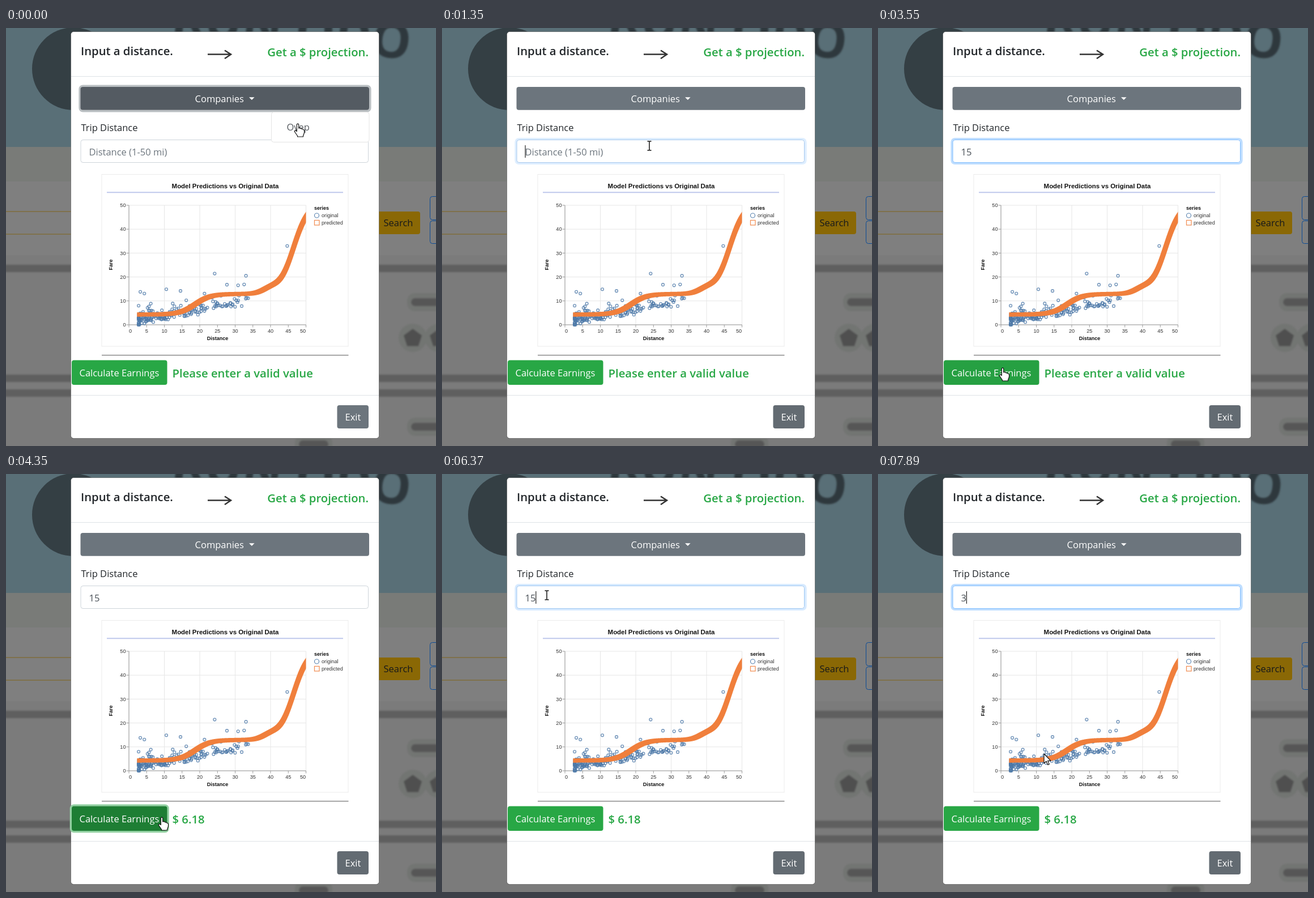
Animation, 759 px wide and 738 px high, one loop 8000 ms. Source, as an HTML page:

```html
<!DOCTYPE html>
<html lang="en">
<head>
<meta charset="utf-8">
<title>Trip earnings</title>
<style>
html, body { margin: 0; width: 100%; height: 100%; overflow: hidden; background: #7b7b7b; }
svg { display: block; width: 759px; height: 738px; }
text { font: 16.5px "Open Sans", "Noto Sans", sans-serif; white-space: pre; }
.head { font-size: 20.3px; font-weight: 600; }
.green { fill: #28a745; }
.white { fill: #fff; }
.chart text { font: 9.2px "Liberation Sans", Arial, sans-serif; fill: #333; }
.chart .b { font-weight: 700; font-size: 9px; fill: #111; }
.chart .title { font-weight: 700; font-size: 11.45px; fill: #111; }
.mid { text-anchor: middle; }
.end { text-anchor: end; }
</style>
</head>
<body>
<svg viewBox="0 0 759 738">
  <defs>
    <filter id="soft" x="-20%" y="-60%" width="140%" height="220%"><feGaussianBlur stdDeviation="1.6"/></filter>
    <clipPath id="plot"><rect x="217" y="308" width="312.5" height="222"/></clipPath>
  </defs>

  <rect width="759" height="210" fill="#596f77"/>
  <circle cx="119" cy="72" r="73" fill="#343f44"/>
  <text transform="translate(290 8) rotate(6.5)" style="font-size:88px;font-weight:700" fill="#2f393d" filter="url(#soft)">RUN ODO</text>
  <rect y="210" width="759" height="61" fill="#797b78"/>
  <rect y="271" width="759" height="130" fill="#7f7f7f"/>
  <rect x="-5" y="324" width="200" height="40" fill="none" stroke="#80651a"/>
  <rect x="600" y="324" width="131" height="40" rx="4" fill="#8a6805"/>
  <text x="666.5" y="350" fill="#16181b">Search</text>
  <g fill="none" stroke="#0b4c97">
    <rect x="748.5" y="297.5" width="40" height="41" rx="4"/>
    <rect x="748.5" y="340.5" width="40" height="40" rx="4"/>
  </g>
  <g id="marks" filter="url(#soft)"></g>

  <rect x="114.5" y="6.5" width="544" height="718" rx="5" fill="#fff" stroke="#000" stroke-opacity=".35"/>
  <path d="M115 85.5H658M115 648.5H658" stroke="#dee2e6"/>
  <text class="head" x="132" y="48" fill="#212529">Input a distance.</text>
  <path d="M356 46.5H396M386 39.5L397 46.5L386 54" fill="none" stroke="#333" stroke-width="2.5"/>
  <text class="head green end" x="640" y="50">Get a $ projection.</text>

  <rect id="menuRing" x="130.2" y="102.2" width="512.6" height="44.6" rx="5.5" fill="none" stroke="#828a91" stroke-opacity=".55" stroke-width="3.6"/>
  <rect id="menu" x="131.5" y="104" width="509.5" height="40.7" rx="4"/>
  <text class="white" x="333.5" y="131">Companies</text>
  <path d="M429 122.2h9.6l-4.8 4.8z" fill="#fff"/>

  <text x="132.5" y="182" fill="#212529">Trip Distance</text>
  <rect id="fieldRing" x="130.2" y="195.7" width="511.6" height="43.6" rx="5.5" fill="none" stroke="#bfdeff" stroke-width="3.6"/>
  <rect id="field" x="132" y="197.5" width="507.5" height="40" rx="4" fill="#fff"/>
  <rect id="picked" x="147" y="207" width="18" height="22" fill="#2f7fe0"/>
  <text id="value" x="146.5" y="225"></text>
  <path id="caret" d="M0 207V229" stroke="#222" stroke-width="1.2"/>

  <g class="chart">
    <rect x="169" y="258.5" width="435" height="303.5" fill="#fff" stroke="#ebebeb"/>
    <text class="title mid" x="387" y="282.5">Model Predictions vs Original Data</text>
    <path d="M178 290.3H595" stroke="#bfc8ec" stroke-width="2"/>
    <g id="axes"></g>
    <text class="b mid" x="373.5" y="551">Distance</text>
    <text class="b mid" transform="translate(188 418) rotate(-90)">Fare</text>
    <g id="dots" fill="none" stroke="#4c78a8" stroke-width="1.35" stroke-opacity=".8"></g>
    <path id="curve" fill="#f07f3c" clip-path="url(#plot)"/>
    <text class="b" x="544" y="320.5">series</text>
    <circle cx="548.5" cy="331" r="4" fill="none" stroke="#5f87b2" stroke-width="1.2"/>
    <rect x="544.5" y="339.5" width="8.5" height="8.5" fill="none" stroke="#f2925a" stroke-width="1.3"/>
    <text x="557" y="334">original</text>
    <text x="557" y="347">predicted</text>
  </g>
  <path d="M169 577.7H604.5" stroke="#777" stroke-width="1.2"/>

  <rect id="calcRing" x="114.5" y="585" width="171.5" height="46.5" rx="5.5" fill="none" stroke="#93d1a2" stroke-width="3.6"/>
  <rect id="calc" x="116" y="586.5" width="168.5" height="43.5" rx="4"/>
  <text class="white" x="129.5" y="615">Calculate Earnings</text>
  <text id="result" class="head green" x="293.5" y="616.5"></text>
  <rect id="exit" x="584.5" y="666" width="55.5" height="41" rx="4"/>
  <text class="white" x="598.5" y="693">Exit</text>

  <g id="drop">
    <rect x="468.5" y="148.5" width="172.5" height="53" rx="4" fill="#fff" stroke="#e4e4e4"/>
    <text x="495.5" y="181" fill="#555a5f">Ovep</text>
  </g>
  <path id="cursor" stroke="#111" stroke-linejoin="round"/>
</svg>
<script>
const LOOP = 8000;
const $ = id => document.getElementById(id);

function add(parent, tag, attrs, text) {
  const el = document.createElementNS("http://www.w3.org/2000/svg", tag);
  for (const k in attrs) el.setAttribute(k, attrs[k]);
  if (text !== undefined) el.textContent = text;
  parent.append(el);
}

function set(id, attrs) {
  for (const k in attrs) $(id).setAttribute(k, attrs[k]);
}

// Dimmed cards behind the dialog: gaps, blurred labels and rating marks.
function drawMarks() {
  const box = (x, y, width, height, fill, rx = 0) => add($("marks"), "rect", { x, y, width, height, fill, rx });
  for (const y of [418, 612, 638]) box(-20, y, 800, 13, "#5e5e5e");
  for (const [x, y, w] of [[715, 477, 70], [715, 697, 70], [517, 728, 52]]) {
    box(x - 7, y - 9, w + 14, 32, "#727572", 14);
    box(x, y, w, 14, "#575757", 7);
  }
  for (const cx of [718, 764]) {
    add($("marks"), "circle", { cx, cy: 547, r: 25, fill: "#727572" });
    const corners = [0, 1, 2, 3, 4].map(i => {
      const a = (i * 0.4 - 0.5) * Math.PI;
      return [cx + 17 * Math.cos(a), 548 + 17 * Math.sin(a)];
    });
    add($("marks"), "path", { d: `M${corners.join("L")}Z`, fill: "#505050" });
  }
}

function drawChart() {
  const X = v => 217 + v * 6.25, Y = v => 524 - v * 4.22;
  const axes = $("axes");
  for (let v = 0; v <= 50; v += 5) {
    const x = X(v), y = Y(v);
    if (v % 10 === 0) {
      add(axes, "path", { d: `M${x} 313V524M217 ${y}H529.5`, stroke: "#e6e6e6" });
      add(axes, "path", { d: `M212.5 ${y}H217`, stroke: "#999" });
      add(axes, "text", { x: 211.5, y: y + 3.2, class: "end" }, v);
    }
    add(axes, "path", { d: `M${x} 524v4.5`, stroke: "#999" });
    add(axes, "text", { x: Math.min(524, Math.max(219.5, x)), y: 538, class: "mid" }, v);
  }
  add(axes, "path", { d: "M217 313V524H529.5", stroke: "#999", fill: "none" });

  let seed = 11;
  const rnd = () => (seed = (seed * 16807) % 2147483647) / 2147483647;
  const dot = (v, fare) => add($("dots"), "circle", { cx: X(v), cy: Y(fare), r: 2.4 });
  for (let i = 0; i < 200; i++) {
    const v = 2.7 + 31 * rnd() ** 2.3;
    const noise = (rnd() + rnd() - 1) * 2.6 + 13 * rnd() ** 7;
    dot(v, Math.max(0, 0.4 + 0.3 * v + noise));
  }
  dot(44.7, 33);

  // Two logistic rises, stamped as a run of square marks.
  const rise = (v, mid, width) => 1 / (1 + Math.exp((mid - v) / width));
  const fare = v => 4.3 + 8.6 * rise(v, 18.7, 2.2) + 38 * rise(v, 46.4, 2.1)
    + 1.7 * Math.exp(-(((v - 40) / 3.2) ** 2));
  let d = "";
  for (let v = 2.9; v < 51; v += 0.05) d += `M${X(v) - 3.8} ${Y(fare(v)) - 3.8}h7.6v7.6h-7.6z`;
  set("curve", { d });
}

// The picture only changes inside these bursts: start, end, steps.
const bursts = [[120, 1060, 8], [1200, 1780, 5], [2290, 2410, 2], [2790, 3690, 7], [3840, 4790, 8],
  [4930, 5940, 9], [6080, 7040, 8], [7340, 7340, 1], [7730, 7890, 2]];

function snap(t) {
  const burst = bursts.findLast(b => b[0] <= t);
  if (!burst) return 0;
  const [start, end, n] = burst;
  const step = (end - start) / (n - 1) || 1;
  return start + Math.min(n - 1, Math.floor((t - start) / step + 1e-6)) * step + 0.01;
}

const clamp = k => Math.min(1, Math.max(0, k));
const ramp = (t, from, ms = 280) => clamp((t - from) / ms);

function mix(a, b, k) {
  const rgb = hex => [1, 3, 5].map(i => parseInt(hex.slice(i, i + 2), 16));
  const to = rgb(b);
  return `rgb(${rgb(a).map((c, i) => Math.round(c + (to[i] - c) * k))})`;
}

// Pointer way points: time, x, y.
const track = [[0, 515, 169], [388, 526, 180], [1780, 293, 220], [2790, 293, 220], [3540, 220, 600],
  [4247, 275, 606], [4790, 283, 609], [5940, 368, 284], [6354, 185, 214], [6765, 109, 222],
  [7040, 125, 230], [7340, 128, 231], [7800, 128, 231], [7890, 293, 494], [LOOP, 293, 494]];

function pointer(t) {
  const i = track.findLastIndex(row => row[0] <= t);
  const a = track[i], b = track[i + 1];
  const k = (t - a[0]) / (b[0] - a[0]);
  return [1, 2].map(j => Math.round(a[j] + (b[j] - a[j]) * k));
}

const shapes = {
  hand: "M-1.7 13.5V1.8a1.7 1.7 0 0 1 3.4 0V8l1.2-.6 2.3.5.6.9 2.3.3.7.9 1.7.4 1 1.4V16l-2 5.5v1.5H-.5V21.5L-5.3 14.5a1.5 1.5 0 0 1 2-2.2z",
  arrow: "M0 0V17L4 13.2 6.7 19.5 9.3 18.4 6.6 12.3H12Z",
  beam: "M-3.5-8H-1Q0-8 0-7V7Q0 8-1 8H-3.5M3.5-8H1Q0-8 0-7M0 7Q0 8 1 8H3.5"
};

function shapeAt(t, x, y) {
  const dragging = t > 6400 && t < 6950;
  const inField = x > 132 && x < 640 && y > 197 && y < 238;
  if (dragging || inField) return "beam";
  const onButton = x > 116 && x < 282 && y > 586 && y < 630;
  return t < 500 || onButton ? "hand" : "arrow";
}

const FOCUS = 1250, KEY1 = 2410, KEY5 = 2790, PRESS = 3840, REFOCUS = 6250, SELECT = 6620, KEY3 = 7730;
const BLINK = 515;

function render(time) {
  const t = snap(time);

  set("menu", { fill: mix("#545b62", "#6c757d", ramp(t, 0, 780)) });
  set("menuRing", { opacity: 1 - ramp(t, 0, 250) });
  set("drop", { opacity: t < 120 ? 1 : 0 });
  set("exit", { fill: t < 120 ? "#6c757d" : "#636b72" });

  const focus = ramp(t, 1200) - ramp(t, 3700) + ramp(t, 6180);
  set("fieldRing", { opacity: focus });
  set("field", { stroke: mix("#ced4da", "#80bdff", focus) });

  const value = t < KEY1 ? "" : t < KEY5 ? "1" : t < KEY3 ? "15" : "3";
  const picked = t > SELECT && t < KEY3;
  $("value").textContent = value || "Distance (1-50 mi)";
  set("value", { fill: picked ? "#fff" : value ? "#495057" : "#6c757d" });
  set("picked", { opacity: picked ? 1 : 0 });

  const last = [FOCUS, KEY1, KEY5, REFOCUS, KEY3].findLast(e => e <= t);
  const typing = last && !picked && (t < PRESS || t > REFOCUS);
  const lit = typing && Math.floor((t - last) / BLINK) % 2 === 0;
  set("caret", { opacity: lit ? 1 : 0, transform: `translate(${147 + 9.4 * value.length})` });

  const pressed = 0.3 * ramp(t, 3390) + 0.7 * ramp(t, 3700) - ramp(t, 4510);
  set("calc", { fill: mix("#28a745", "#1e7e34", pressed) });
  set("calcRing", { opacity: ramp(t, 3700) - ramp(t, 6080) });
  $("result").textContent = t < PRESS + 130 ? "Please enter a valid value" : "$ 6.18";

  const [x, y] = pointer(t), shape = shapeAt(t, x, y), beam = shape === "beam";
  set("cursor", {
    d: shapes[shape], fill: beam ? "none" : "#fff", "stroke-width": beam ? 1.5 : 1.2,
    transform: `translate(${x} ${y})`
  });
}

drawMarks();
drawChart();
render(0);
const begin = performance.now();
(function tick() {
  render((performance.now() - begin) % LOOP);
  requestAnimationFrame(tick);
})();
</script>
</body>
</html>
```
